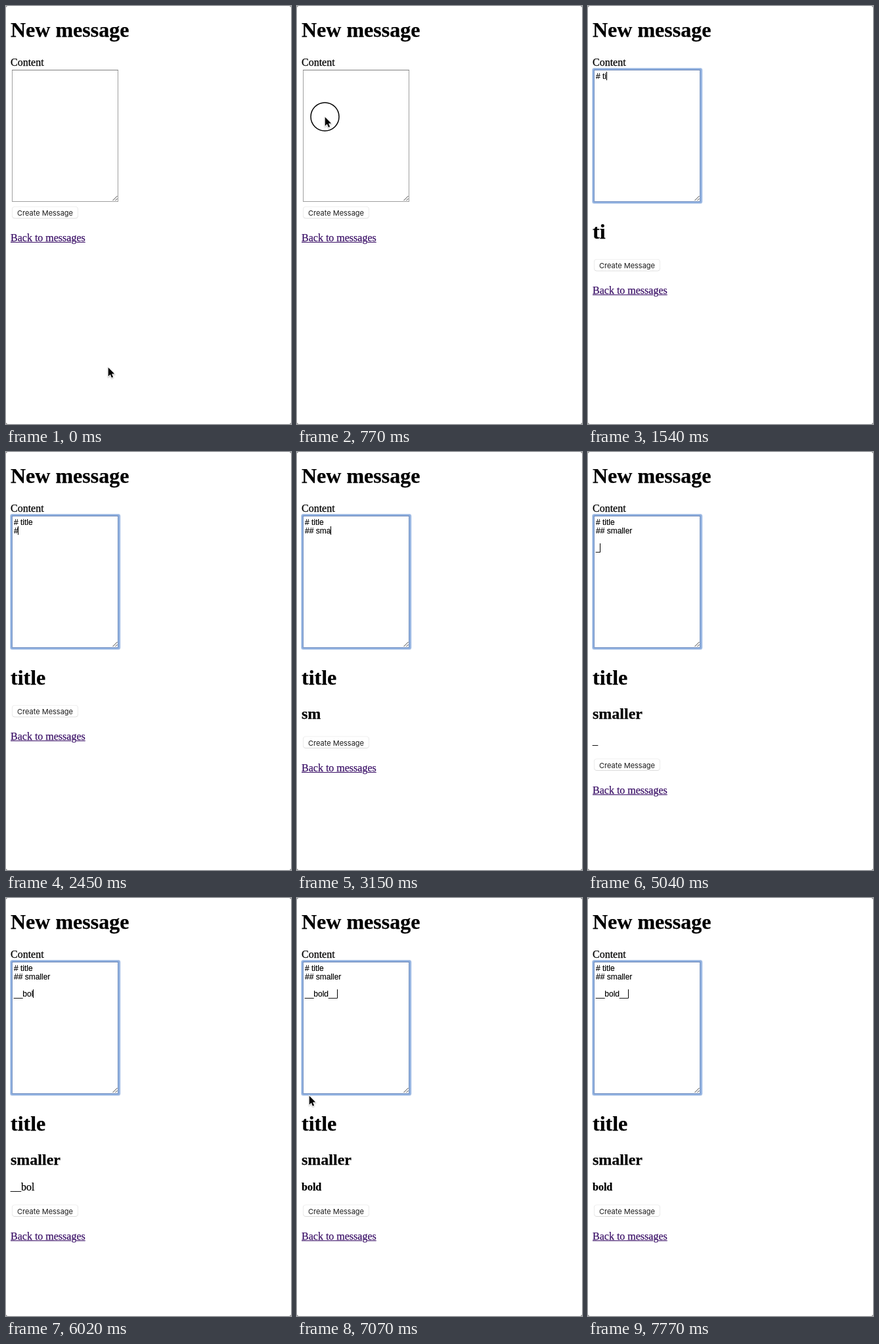
An HTML page with a canvas for the animation above (7840 ms loop, 434 by 636 pixels).

```html
<!DOCTYPE html>
<html lang="en">
<head>
<meta charset="utf-8">
<title>New message</title>
<style>
  html, body { margin: 0; width: 100%; height: 100%; overflow: hidden; background: #fff; }
  canvas { display: block; width: 434px; height: 636px; }
</style>
</head>
<body>
<canvas id="stage"></canvas>
<script>
const W = 434, H = 636, LOOP = 7840, TICK = 70;
const SERIF = '"Liberation Serif", Times, serif';
const UI = '11px Inter, "Liberation Sans", sans-serif';
const DRAFT = '12px "Liberation Sans", Arial, sans-serif';
const LEFT = 7;
const KEY_GAP = 105;      // between keys inside a burst
const RENDER_DELAY = 35;  // preview runs behind the keyboard

// Bursts of typing: start time and keys
const BURSTS = [
  [1050, '#'], [1330, ' '], [1400, 'ti'], [1680, 'tle'], [2100, '\n'],
  [2450, '#'], [2590, '#'], [2800, ' '], [2940, 'smaller'], [3920, '\n'],
  [4340, '\n'], [4900, '_'], [5390, '_'], [5670, 'b'], [5880, 'old'],
  [6300, '_'], [6650, '_'],
];

const canvas = document.getElementById('stage');
const ctx = canvas.getContext('2d');
const dpr = window.devicePixelRatio || 1;
canvas.width = W * dpr;
canvas.height = H * dpr;

function draftAt(t) {
  let out = '';
  for (const [at, keys] of BURSTS) {
    if (t >= at) out += keys.slice(0, 1 + Math.floor((t - at) / KEY_GAP));
  }
  return out;
}

const clamp = p => Math.max(0, Math.min(1, p));
const smooth = p => p * p * (3 - 2 * p);
const mix = (a, b, p) => a + (b - a) * p;

function text(str, x, y, font, color = '#000', weight = 0.25) {
  ctx.font = font;
  ctx.fillStyle = ctx.strokeStyle = color;
  ctx.fillText(str, x, y);
  if (weight) {
    ctx.lineWidth = weight;
    ctx.strokeText(str, x, y);
  }
  return ctx.measureText(str).width;
}

function roundRect(x, y, w, h, r, color) {
  ctx.beginPath();
  ctx.roundRect(x, y, w, h, r);
  ctx.fillStyle = color;
  ctx.fill();
}

function drawField(t) {
  const focused = t >= 840;
  if (focused) {
    roundRect(6, 94, 168.5, 207, 3.5, 'rgba(125,163,218,0.45)');
    roundRect(7, 95, 166.5, 205, 2.5, '#8eafdf');
  }
  ctx.fillStyle = '#fff';
  ctx.fillRect(9, 97, 162, 201);
  ctx.lineWidth = 1;
  ctx.strokeStyle = focused ? '#7c97c4' : '#a0a0a0';
  ctx.strokeRect(9.5, 97.5, 161, 200);
  ctx.fillStyle = focused ? '#6d88b8' : '#808080';
  ctx.fillRect(9, 97, 162, 1);

  // resize grip
  ctx.strokeStyle = '#444';
  ctx.beginPath();
  for (const size of [7, 3]) {
    ctx.moveTo(169.5 - size, 296);
    ctx.lineTo(169.5, 296 - size);
  }
  ctx.stroke();

  if (!focused) return;
  const lines = draftAt(t).split('\n');
  let end = 0;
  lines.forEach((line, i) => { end = text(line, 12, 111 + 13 * i, DRAFT, '#000', 0.15); });
  if (t < 7280 || t >= 7770) {
    ctx.fillStyle = '#000';
    ctx.fillRect(Math.floor(12 + end), 100 + 13 * (lines.length - 1), 1, 13);
  }
}

function drawParagraph(src, y) {
  const plain = `16px ${SERIF}`;
  const bold = src.match(/^__(\w+?)__$/);
  const italic = src.match(/^__([a-z]+)_$/);
  if (bold) text(bold[1], LEFT, y, `bold ${plain}`);
  else if (italic) {
    const w = text('_', LEFT, y, plain);
    text(italic[1], LEFT + w, y, `italic ${plain}`);
  } else text(src, LEFT, y, plain);
}

// Draws the rendered draft and returns how far it pushes the page down
function drawPreview(t) {
  const [h1, h2 = '', , par] = draftAt(t - RENDER_DELAY).split('\n');
  if (!h1) return 0;
  const title = h1.slice(2), subtitle = h2.slice(3);
  if (!title) return 21.5;
  text(title, LEFT, 354, `bold 32px ${SERIF}`);
  if (!subtitle) return 80;
  text(subtitle, LEFT, 406, `bold 24px ${SERIF}`);
  if (!par) return 127.5;
  drawParagraph(par, 445);
  return 161.5;
}

function drawButton(y) {
  roundRect(9, y + 0.5, 101, 18, 4.5, '#dcdcdc');
  roundRect(9, y, 101, 17.5, 4.5, '#ececec');
  roundRect(10, y + 0.8, 99, 16.6, 3.5, '#fff');
  text('Create Message', 17, y + 14, UI, '#1c1c1c', 0);
}

function drawLink(y) {
  const color = '#3c1268', label = 'Back to messages';
  const width = text(label, LEFT, y, `16px ${SERIF}`, color);
  const g = LEFT + ctx.measureText('Back to messa').width;
  const lineY = Math.round(y) + 1;
  ctx.fillRect(LEFT, lineY, g - LEFT - 0.5, 1);
  ctx.fillRect(g + 8.5, lineY, LEFT + width - g - 8.5, 1);
}

function pointerAt(t) {
  if (t < 1050) {
    const p = smooth(clamp(t / 420));
    return [mix(155, 42, p), mix(549, 168, p)];
  }
  if (t < 7070 || t >= 7560) return null;
  // sweeps down to the bottom edge, then slips off the page
  const p = clamp((t - 7070) / 210) + (t >= 7490 ? 0.04 : 0);
  return [mix(18, 168, p), mix(300, 609, p)];
}

function drawPointer(t) {
  const pos = pointerAt(t);
  if (!pos) return;
  ctx.save();
  ctx.translate(pos[0] + 0.7, pos[1] + 0.9);
  ctx.beginPath();
  [[0, 0], [0, 13.6], [3.1, 10.7], [5.2, 15.6], [7.4, 14.7], [5.3, 9.9], [9.4, 9.6]]
    .forEach(([x, y]) => ctx.lineTo(x, y));
  ctx.closePath();
  ctx.shadowColor = 'rgba(0,0,0,0.3)';
  ctx.shadowBlur = 2 * dpr;
  ctx.shadowOffsetY = dpr;
  ctx.lineWidth = 1.6;
  ctx.strokeStyle = '#fff';
  ctx.stroke();
  ctx.shadowColor = 'transparent';
  ctx.fillStyle = '#000';
  ctx.fill();
  ctx.restore();
}

function drawClick(t) {
  if (t < 420 || t >= 840) return;
  ctx.beginPath();
  ctx.arc(42.5, 168.5, 21.5, 0, Math.PI * 2);
  ctx.lineWidth = 1.5;
  ctx.strokeStyle = '#000';
  ctx.stroke();
}

function draw(now) {
  const t = Math.floor((now % LOOP) / TICK) * TICK;
  ctx.setTransform(dpr, 0, 0, dpr, 0, 0);
  ctx.fillStyle = '#666';
  ctx.fillRect(0, 0, W, H);
  roundRect(0, 0, W, H, 3, '#fff');

  text('New message', LEFT, 47, `bold 32px ${SERIF}`);
  text('Content', LEFT, 91, `16px ${SERIF}`);
  drawField(t);
  const shift = drawPreview(t);
  drawButton(305 + shift);
  drawLink(358 + shift);
  drawClick(t);
  drawPointer(t);
}

const start = performance.now();
function tick() {
  draw(performance.now() - start);
  requestAnimationFrame(tick);
}
tick();
</script>
</body>
</html>
```
